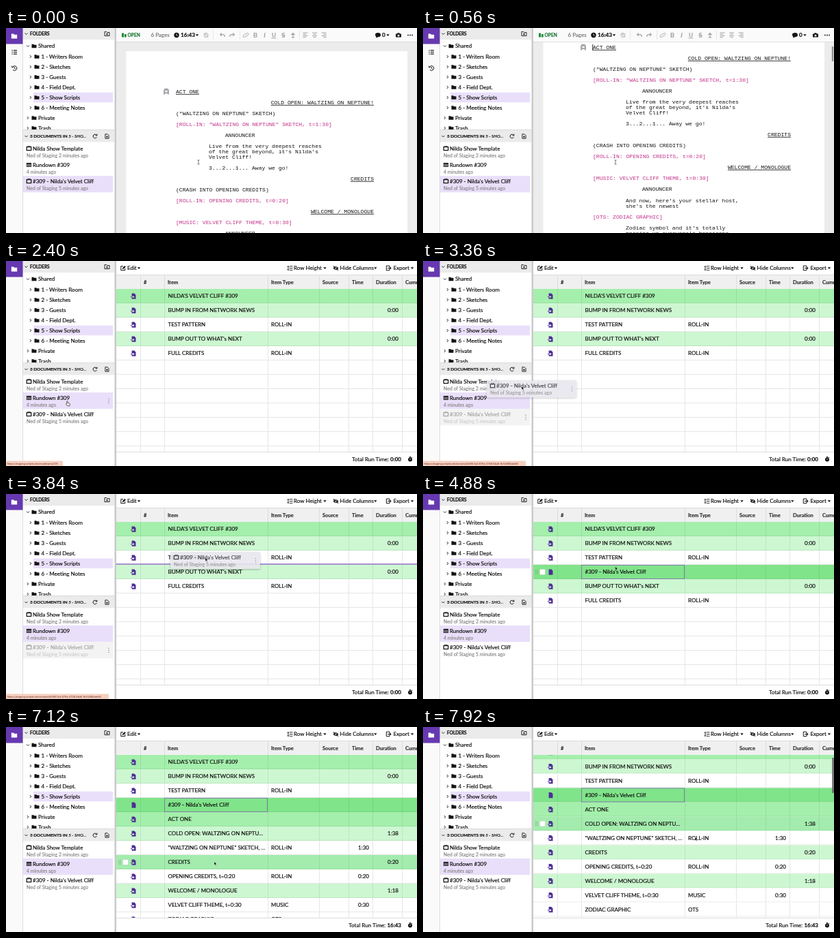
An HTML page that plays this animation: 600 px wide and 301 px high, repeating every 8000 ms.

```html
<!DOCTYPE html>
<html lang="en">
<head>
<meta charset="utf-8">
<title>Rundown import</title>
<style>
  html, body { margin: 0; width: 100%; height: 100%; overflow: hidden; background: #fff; }
  svg { display: block; width: 600px; height: 301px; font-family: Lato, "Open Sans", sans-serif; }
  text { white-space: pre; stroke-width: .2px; }
  .mono { font-family: "Liberation Mono", "Courier New", monospace; stroke: none; }
  .keys { font-family: Lato, "DejaVu Sans", sans-serif; stroke: none; }
  .url { font-family: "DejaVu Sans", sans-serif; stroke: none; }
</style>
</head>
<body>
<svg id="stage" viewBox="0 0 600 301" xmlns="http://www.w3.org/2000/svg"></svg>
<script>
const LOOP = 8000, STEP = 80;
const INK = '#141414', GREY = '#8a8a8a', PURPLE = '#4f2d96', LILAC = '#e9dffa', PINK = '#c2318a';
const ROW = 21, TOP = 41;
const DROP = 4400, MENU = 5360, IMPORT = 6560, LOADED = 1840;

// y is the vertical middle of the capitals
const text = (x, y, s, size = 8, fill = INK, attrs = '') =>
  `<text x="${x}" y="${y + size * 0.36}" font-size="${size}" fill="${fill}" stroke="${fill}" ${attrs}>${s}</text>`;
const box = (x, y, w, h, fill, attrs = '') =>
  `<rect x="${x}" y="${y}" width="${w}" height="${h}" fill="${fill}" ${attrs}/>`;
const shape = (x, y, d, fill = INK) => `<path transform="translate(${x} ${y})" d="${d}" fill="${fill}" fill-rule="evenodd"/>`;
const line = (x, y, d, color = INK, w = 1) =>
  `<path transform="translate(${x} ${y})" d="${d}" fill="none" stroke="${color}" stroke-width="${w}"/>`;
const group = (id, body, attrs = '') => `<g id="${id}" ${attrs}>${body}</g>`;
const BOLD = 'font-weight="700"', END = 'text-anchor="end"';

const FOLDER = 'M-3.5-2.8h2.7l1 1h3.3v4.6h-7z';
const FILE = 'M-2.9-4.1h3.7l2.2 2.2v6h-5.9z';
const IMPORT_FILE = FILE + 'M-4.4.4h1.5v1.2h-1.5zM-2.9.4h1.9v-1.3l2.1 1.9-2.1 1.9v-1.3h-1.9z';
const SCRIPT = 'M-3.2-2.3h6.4v5h-6.4zM-1.8-3.7l1.8 1.4 1.8-1.4';
const down = (x, y, c = INK) => shape(x, y, 'M-2.2-1.2h4.4l-2.2 2.6z', c);
const chevron = (x, y) => line(x, y, 'M-2-1l2 2 2-2', INK, .9);
const folder = (x, y) => shape(x, y, FOLDER);
const dots = (x, y) => [-3, 0, 3].map(d => `<circle cx="${x}" cy="${y + d}" r=".7" fill="#8a7d9a"/>`).join('');
const grid = (x, y) => shape(x, y, 'M-3.6-3h7.2v6h-7.2zM-2.8-1.2v.9h1.5v-.9zM-.7-1.2v.9h1.4v-.9zM1.3-1.2v.9h1.5v-.9zM-2.8.8v1.2h1.5v-1.2zM-.7.8v1.2h1.4v-1.2zM1.3.8v1.2h1.5v-1.2z');
const fileAdd = (x, y) => line(x, y, 'M-2.6-3.2h3.2l2 2v4.4h-5.2zM-1.4.8h2.8M0-.6v2.8', INK, 0.9);
const watch = (x, y) => `<circle cx="${x}" cy="${y + .5}" r="3" fill="${INK}"/>` +
  line(x, y, 'M-1.2-3.4h2.4M0-3v1M2-2l1-1', INK, 1) + line(x, y, 'M0-.9v1.8', '#fff', .8);

function sidebar() {
  const kids = ['1 - Writers Room', '2 - Sketches', '3 - Guests', '4 - Field Dept.', '5 - Show Scripts', '6 - Meeting Notes'];
  const right = (x, y) => line(x, y, 'M-1.2-2l2 2-2 2', INK, .9);
  let s = box(0, 0, 161, 301, '#fff') + box(0, 0, 24.5, 301, '#fafafa') + box(24, 0, 1, 301, '#dcdcdc') +
    box(0, 0, 24.5, 23.5, '#6639b0') + shape(12, 12, 'M-4.2-3.4h3.2l1.2 1.2h4v5.6h-8.4z', '#fff');
  s += group('rail',
    line(12.5, 35.5, 'M-1.5-2.7h5M-1.5 0h5M-1.5 2.7h5M-4-2.7h1.4M-4 0h1.4M-4 2.7h1.4', INK, 1.2) +
    line(12.5, 59, 'M-2.6-2.2A3.4 3.4 0 1 1-2.5 2.4M-3.8-3.4v2.2h2.3M0-1.8v2l1.4.8', INK, 1));
  s += box(25, 0, 133.5, 17, '#ebebeb') + chevron(29.5, 8.5) + text(35, 8.5, 'FOLDERS', 6.5, INK, BOLD) +
    line(147.5, 8.5, 'M-3.5-3h2.6l1 1h3.4v5h-7zM-1.5.6h3M0-.9v3', INK, .9);
  s += chevron(32, 26.5) + folder(41, 26.5) + text(47, 26.5, 'Shared') +
    box(40, 94.7, 116, 14.5, LILAC);
  kids.forEach((k, i) => {
    const y = 42 + i * 15;
    s += right(36, y) + folder(45, y) + text(51.5, y, k);
  });
  s += right(32, 132) + folder(41, 132) + text(47, 132, 'Private') +
    right(32, 147) + folder(41, 147) + text(47, 147, 'Trash');
  s += box(25, 149, 133.5, 18.5, '#ebebeb') + box(25, 149, 133.5, .7, '#d5d5d5') + chevron(29.5, 159) +
    text(35, 159, '3 DOCUMENTS IN <tspan font-style="italic" font-weight="400">5 - SHO…</tspan>', 6.4, INK, BOLD) +
    line(130, 159, 'M2.4 1.3A2.8 2.8 0 1 1 2.2-1.7M2.9-3.4v2.3h-2.3', INK, 1) + fileAdd(147.5, 159);
  const docs = [
    ['Nilda Show Template', 'Ned of Staging 2 minutes ago'],
    ['Rundown #309', '4 minutes ago'],
    ["#309 - Nilda's Velvet Cliff", 'Ned of Staging 5 minutes ago']
  ];
  docs.forEach((d, i) => {
    s += box(25, 168.8 + i * 24.2, 131, 24.2, LILAC, `id="bg${i}"`) + group('doc' + i, docLabel(d, i));
    s += group('dots' + i, dots(150, 181.5 + i * 24));
  });
  s += box(158.5, 0, 2.5, 301, '#c9c9cb');
  s += group('status', box(0, 293.5, 83, 8, '#f6cfc0', 'id="statusBg" rx="1"') +
    text(1.5, 297.3, '', 3.6, '#5f2a1c', 'id="url" class="url"'));
  return s;
}
function docLabel([title, sub], i) {
  const y = 177 + i * 24;
  const icon = i === 1 ? grid(33.5, y) : line(33.5, y, SCRIPT, INK, 1.3);
  return icon + text(39, y, title) + text(30, y + 10.2, sub, 7, GREY);
}

function script() {
  const lines = [
    [93, 248, 'ACT ONE', 'u'], [109, 537, 'COLD OPEN: WALTZING ON NEPTUNE!', 'r'],
    [125, 248, '("WALTZING ON NEPTUNE" SKETCH)'], [141, 248, '[ROLL-IN: "WALTZING ON NEPTUNE" SKETCH, t=1:30]', 'p'],
    [157, 320, 'ANNOUNCER'], [173, 296, 'Live from the very deepest reaches'],
    [181, 296, "of the great beyond, it's Nilda's"], [189, 296, 'Velvet Cliff!'],
    [205, 296, '3...2...1... Away we go!'], [221, 537, 'CREDITS', 'r'],
    [237, 248, '(CRASH INTO OPENING CREDITS)'], [253, 248, '[ROLL-IN: OPENING CREDITS, t=0:20]', 'p'],
    [269, 537, 'WELCOME / MONOLOGUE', 'r'], [285.5, 248, '[MUSIC: VELVET CLIFF THEME, t=0:30]', 'p'],
    [301.5, 320, 'ANNOUNCER'], [318, 296, "And now, here's your stellar host,"],
    [326, 296, "she's the newest"], [342, 248, '[OTS: ZODIAC GRAPHIC]', 'p'],
    [358, 296, "Zodiac symbol and it's totally"], [366, 296, "messing up everyone's horoscope"]
  ];
  let page = box(175.5, 34, 410.5, 500, '#fff') +
    shape(234, 93.5, 'M-4 4v-5a4 4 0 0 1 8 0v5h-2l-.7-1.6h-2.6l-.7 1.6zM-1.6-1.6v2.2h3.2v-2.2z', '#a9a9ae');
  for (const [y, x, s, kind = ''] of lines) {
    const under = kind === 'u' || kind === 'r' ? 'text-decoration="underline"' : '';
    page += text(x, y, s, 8.08, kind === 'p' ? PINK : INK, `class="mono" ${under} ${kind === 'r' ? END : ''}`);
  }
  page += box(247.3, 89, .9, 9, INK, 'id="caret"');
  const soft = '#a3a3a3', rule = x => box(x, 3, .7, 14, '#dedede');
  let bar = box(161, 0, 439, 20, '#fafafa') + box(161, 20, 439, .8, '#d9d9d9') +
    shape(172.5, 10.5, 'M-3.5 3v-6h3v6zM.4 3v-4.6h2.8v4.6z', '#1e8a3b') + text(177.5, 10.5, 'OPEN', 6.6, '#187a33', BOLD) +
    text(211.5, 10.5, '6 Pages', 8, '#777') +
    `<circle cx="249" cy="10.5" r="3.7" fill="${INK}"/>` + line(249, 10.5, 'M0-2.2v2.4l1.5 1', '#fff', .8) +
    text(255, 10.5, '16:43', 8.2, INK, BOLD) + down(279, 10.5) +
    line(292, 10.5, 'M-3 0a3 3 0 1 0 6 0a3 3 0 1 0-6 0M-3-3l6 6M0-1.8v1.8', soft, .9) + rule(302) +
    line(316, 10.5, 'M-1.2-3l-2.2 2.2 2.2 2.2M-3-.8h3.6q2.8 0 2.8 3.4', soft, 1.2) +
    line(330, 10.5, 'M1.2-3l2.2 2.2-2.2 2.2M3-.8h-3.6q-2.8 0-2.8 3.4', soft, 1.2) + rule(341) +
    line(350, 10.5, 'M-.3 1.6l-1.2 1.2a1.5 1.5 0 0 1-2.1-2.1l1.9-1.9a1.5 1.5 0 0 1 2.1 0M.3-1.6l1.2-1.2a1.5 1.5 0 0 1 2.1 2.1l-1.9 1.9a1.5 1.5 0 0 1-2.1 0', soft, 1) +
    text(364, 10.5, 'B', 9, soft, BOLD + ' text-anchor="middle"') +
    text(377.5, 10.5, 'I', 9, soft, 'font-style="italic" font-weight="700" text-anchor="middle"') +
    text(391, 10.2, 'U', 8.4, soft, 'font-weight="700" text-decoration="underline" text-anchor="middle"') +
    text(405, 10.5, 'S', 9, soft, 'font-weight="700" text-decoration="line-through" text-anchor="middle"') +
    line(419, 10.5, 'M0 3.5v-6M-2.6-.2l2.6-2.8 2.6 2.8M-2 3.4h4', soft, 1.2) + rule(428);
  ['M-3.5-3h7M-3.5-.8h4.5M-3.5 1.4h7M-3.5 3.6h4.5', 'M-3.5-3h7M-2.2-.8h4.4M-3.5 1.4h7M-2.2 3.6h4.4', 'M-3.5-3h7M-1-.8h4.5M-3.5 1.4h7M-1 3.6h4.5']
    .forEach((d, i) => bar += line(437 + i * 13.6, 10, d, soft, 1));
  bar += shape(543, 10.5, 'M-4-.4a4 3.2 0 1 1 4 3.2q-1.4 1-3.3 1 1-.9.7-1.7q-1.4-1-1.4-2.5z') +
    text(549, 10.5, '0', 8.2, INK, BOLD) + down(557.5, 10.5) +
    shape(573, 10.5, 'M-4-2h2l.8-1.3h2.4l.8 1.3h2v5h-8zM-1.5.4a1.5 1.5 0 1 0 3 0a1.5 1.5 0 1 0-3 0z') +
    [587, 590, 593].map(x => `<circle cx="${x}" cy="10.5" r=".9" fill="${INK}"/>`).join('');
  return box(161, 20, 439, 281, '#ececec') +
    `<g clip-path="url(#docClip)">${group('page', page)}${group('blank', box(161, 20, 439, 281, '#fff'))}</g>` +
    box(596.8, 27, 2.4, 22, '#8f8f8f', 'id="docThumb" rx="1.2"') + bar;
}

const COLS = [196, 231, 382, 457, 500, 535, 578];
const FILL = { a: '#a4efab', b: '#cdf7d1', s: '#80e48a', w: '#fff' };
const HOVER = { a: '#8fe798', b: '#a3ecad', s: '#80e48a', w: '#f5f5f5' };
const BASE = [
  ['a', "NILDA'S VELVET CLIFF #309"], ['b', 'BUMP IN FROM NETWORK NEWS', '', '', '0:00'],
  ['w', 'TEST PATTERN', 'ROLL-IN'], ['b', "BUMP OUT TO WHAT's NEXT", '', '', '0:00'], ['w', 'FULL CREDITS', 'ROLL-IN']
];
const ADDED = [
  ['a', 'ACT ONE'], ['b', 'COLD OPEN: WALTZING ON NEPTU…', '', '', '1:38'],
  ['w', '"WALTZING ON NEPTUNE" SKETCH, …', 'ROLL-IN', '1:30'], ['b', 'CREDITS', '', '', '0:20'],
  ['w', 'OPENING CREDITS, t=0:20', 'ROLL-IN', '0:20'], ['b', 'WELCOME / MONOLOGUE', '', '', '1:18'],
  ['w', 'VELVET CLIFF THEME, t=0:30', 'MUSIC', '0:30'], ['w', 'ZODIAC GRAPHIC', 'OTS'], ['w', '']
];
const LINK = ['s', "#309 - Nilda's Velvet Cliff"];
const split = extra => [...BASE.slice(0, 3), ...extra, ...BASE.slice(3)];

function rows(list) {
  let s = '', selected = '';
  for (let i = 0; i < 15; i++) {
    const y = TOP + i * ROW, mid = y + 10.3, [kind, item, type = '', time = '', dur = ''] = list[i] || ['w', ''];
    const edge = kind === 'w' ? '#e6e6e6' : 'rgba(60,110,70,.13)';
    s += box(161, y, 439, ROW, FILL[kind], `class="fill" data-kind="${kind}"`) + box(161, y + ROW - 1, 439, 1, edge);
    COLS.forEach(x => s += box(x, y, 1, ROW - 1, edge));
    if (!item) continue;
    s += shape(186.5, mid + .3, kind === 's' ? FILE : IMPORT_FILE, PURPLE);
    s += text(236.5, mid, item) + text(387, mid, type) + text(530, mid, time, 8, INK, END) + text(573, mid, dur, 8, INK, END);
    if (kind === 's') selected = box(231.5, y + .5, 150, ROW - 1, 'none', 'stroke="#7f75a8" stroke-width=".9"');
  }
  return s + selected;
}

function rundown() {
  const heads = ['#', 'Item', 'Item Type', 'Source', 'Time', 'Duration', 'Cumulative'];
  let s = box(161, 0, 439, 301, '#fff') + `<g clip-path="url(#tableClip)">` + group('body',
    group('rows0', rows(BASE)) + group('rows1', rows(split([LINK]))) + group('rows2', rows(split([LINK, ...ADDED]))) +
    group('hover', line(166, 0, 'M-1.2-3v1M-1.2-.5v1M-1.2 2v1M1.2-3v1M1.2-.5v1M1.2 2v1', '#6f8a74', 1.1) +
      box(170.5, -4, 8, 8, '#fff', 'rx="1.2" stroke="#c3d3c5" stroke-width=".7"'))) +
    box(161, 0, 439, 1.1, '#6a48b5', 'id="dropLine"') + '</g>';
  s += box(161, 20, 439, 21, '#f0f0f0') + box(161, 20, 439, 1, '#dcdcdc');
  heads.forEach((h, i) => s += box(COLS[i], 21, 1, 20, '#dcdcdc') + text(COLS[i] + 5, 31, h, 7.5, '#333', BOLD));
  s += line(171, 10.5, 'M0-2.8h-3.2v6h6v-3', INK, 1) + shape(171, 10.5, 'M-1.2 1.4l.4-1.8 3.2-3.2 1.5 1.5-3.2 3.2z') +
    text(177, 10.5, 'Edit') + down(194, 10.5) +
    line(415, 10.5, 'M-1-2.8h4.5M-1 0h4.5M-1 2.8h4.5M-3-3v6M-4.2-1.8l1.2-1.4 1.2 1.4M-4.2 1.8l1.2 1.4 1.2-1.4', INK, .9) +
    text(420, 10.5, 'Row Height') + down(465.5, 10.5) +
    shape(481.5, 10.5, 'M-4 0q4-5.2 8 0q-4 5.2-8 0zM-1.5 0a1.5 1.5 0 1 0 3 0a1.5 1.5 0 1 0-3 0z') +
    line(481.5, 10.5, 'M-3.6-3.2l7.2 6.4', INK, 1.1) + text(487.5, 10.5, 'Hide Columns') + down(539.3, 10.5) +
    line(558.5, 10.5, 'M1.4-1.4v-2h-4.6v6.6h4.6v-1.8', INK, 1) + shape(558.5, 10.5, 'M-1.4-.6h3v-1.6l2.6 2.2-2.6 2.2v-1.6h-3z') +
    text(565.5, 10.5, 'Export') + down(593, 10.5);
  s += box(161, 280, 439, 21, '#fff') + box(161, 280, 439, 1, '#dcdcdc') +
    text(577, 291, 'Total Run Time: <tspan id="total" font-weight="700">0:00</tspan>', 8, INK, END) + watch(590, 291);
  return s + box(597.3, 45, 2.5, 52, '#666', 'id="rowThumb" rx="1.1"');
}

function menu() {
  const up = 'M0 3.2v-5.4M-2.4-.2l2.4-2.4 2.4 2.4', bar = up + 'M-2.8-3.4h5.6';
  const items = [
    [148.3, 'Insert row above', up, '⌥⌘I'], [163.6, 'Insert Slug row above', bar, ''], [179, 'Insert Act row above', bar, '']
  ];
  const key = (y, s) => text(412, y, s, 6, '#999', END + ' class="keys"');
  let s = box(275, 118, 143, 113, '#fff', 'rx="2.5" filter="url(#shadow)"') + box(275, 0, 143, 15, '#f2f2f2', 'id="menuHover"') +
    shape(284.5, 128, 'M-3.3-3.3h6.6v6.6h-6.6z') + line(284.5, 128, 'M-1.8 0l1.4 1.4 2.4-2.7', '#fff', 1) +
    text(294, 128, 'Select all rows in this Script') + key(128, '⌥Click');
  for (const [y, label, d, k] of items) s += line(284.5, y, d, INK, 1.1) + text(294, y, label) + key(y, k);
  s += shape(284.5, 200, IMPORT_FILE) + text(294, 200, 'Import rows from script') +
    shape(284.5, 220.5, 'M-3-3.4h1.8l.4-.6h1.6l.4.6h1.8v1h-6zM-2.5-1.8h5l-.4 5.4h-4.2z', '#d3222a') +
    text(294, 220.5, 'Delete row', 8, '#d3222a') + key(220.5, '⌘Delete');
  [138, 189.7, 210.3].forEach(y => s += box(275, y, 143, .7, '#e4e4e4'));
  return s;
}

const ghost = box(25, 217, 131, 25, '#e9e6ee', 'opacity=".88" rx="2" filter="url(#shadow)"') +
  `<g opacity=".75">${docLabel(["#309 - Nilda's Velvet Cliff", 'Ned of Staging 5 minutes ago'], 2)}${dots(149.5, 229.5)}</g>`;
const pointers =
  group('beam', line(0, 0, 'M-1.6-3.2q1.6 0 1.6 1v4.4q0 1-1.6 1M1.6-3.2q-1.6 0-1.6 1M0 2.2q0 1 1.6 1', '#555', .8)) +
  group('arrow', '<path d="M0-2.3v5l1.2-1 .9 1.9.9-.4-.9-1.9h1.5z" fill="#000" stroke="#fff" stroke-width=".4"/>') +
  group('hand', '<path d="M-1.2-3q.7-.8 1.3 0v2.5l2.6.6q.9.3.7 1.3l-.5 2.3h-3.4l-2-2.6q0-.9 1.3-.3z" fill="#fff" stroke="#222" stroke-width=".7"/>');

const stage = document.getElementById('stage');
stage.innerHTML = `<defs>
  <clipPath id="docClip"><rect x="161" y="20" width="439" height="281"/></clipPath>
  <clipPath id="tableClip"><rect x="161" y="41" width="439" height="239"/></clipPath>
  <filter id="shadow" x="-10%" y="-20%" width="120%" height="150%"><feDropShadow dx="0" dy="1" stdDeviation="1.8" flood-opacity=".3"/></filter>
  </defs>` + group('script', script()) + group('rundown', rundown()) + sidebar() +
  group('menu', menu()) + group('ghost', ghost) + group('pointer', pointers);

const $ = Object.fromEntries([...stage.querySelectorAll('[id]')].map(n => [n.id, n]));
const fills = [0, 1, 2].map(i => [...$['rows' + i].querySelectorAll('.fill')]);
const show = (id, on) => $[id].setAttribute('display', on ? 'inline' : 'none');
const move = (id, x, y) => $[id].setAttribute('transform', `translate(${x} ${y})`);
const ease = k => k * k * (3 - 2 * k);
const ramp = (t, a, b) => ease(Math.min(1, Math.max(0, (t - a) / (b - a))));

const PATH = [
  [0, 281, 197], [640, 281, 197], [1040, 90, 209], [2480, 90, 209], [2880, 76, 228], [3120, 76, 228],
  [3760, 291, 96], [4560, 291, 96], [5120, 274, 117], [5440, 274, 117], [6000, 304, 186],
  [6160, 304, 186], [6400, 304, 200], [7200, 304, 200], [7600, 397, 164], [8000, 397, 164]
];
function pointerAt(t) {
  const i = PATH.findIndex((p, n) => n && t <= p[0]);
  const [t0, x0, y0] = PATH[i - 1], [t1, x1, y1] = PATH[i], k = ramp(t, t0, t1);
  return [x0 + (x1 - x0) * k, y0 + (y1 - y0) * k];
}

function draw(t) {
  const [x, y] = pointerAt(t);
  const loaded = t >= LOADED, drag = t > 3120 && t < DROP, open = t >= MENU && t < IMPORT;
  const side = x < 158, over = side && !drag ? Math.floor((y - 168.8) / 24.2) : -1;

  show('script', !loaded);
  show('rundown', loaded);
  show('rail', !loaded);
  show('blank', t >= 1520);
  const scroll = 65 * ramp(t, 40, 520);
  move('page', 0, -scroll);
  show('caret', t >= 400 && t < 960);
  show('docThumb', t > 0 && t < 1280);
  move('docThumb', 0, (scroll - 65) / 13);

  const chosen = t >= 1360 ? 1 : 2;
  for (let i = 0; i < 3; i++) {
    const held = drag && i === 2;
    show('bg' + i, i === chosen || i === over || held);
    $['bg' + i].setAttribute('fill', i === chosen ? LILAC : held ? '#f3f3f3' : '#f3edfc');
    show('dots' + i, i === over || held);
    $['doc' + i].setAttribute('opacity', held ? .35 : 1);
  }
  const onScript = over === 2 || t > 2880;
  show('status', over === 1 || over === 2 || t > 2880 && t < 4480);
  $.statusBg.setAttribute('width', onScript ? 150 : 83);
  $.url.textContent = 'https://staging.scripto.dev/' +
    (onScript ? 'scripts/d38f47a4-879e-4708-8ba0-9cf1686bda90' : 'rundowns/239');

  const phase = t >= IMPORT ? 2 : t >= DROP ? 1 : 0;
  for (let i = 0; i < 3; i++) show('rows' + i, i === phase);
  $.total.textContent = phase === 2 ? '16:43' : '0:00';
  move('body', 0, -14.5 * ramp(t, 7600, 7920));
  show('rowThumb', t > 7600);

  // the hovered row is the one under the pointer before the table scrolls
  const hovering = loaded && !side && !drag && !open, row = Math.floor((y - TOP) / ROW);
  fills[phase].forEach((f, i) => f.setAttribute('fill', (hovering && i === row ? HOVER : FILL)[f.dataset.kind]));
  show('hover', hovering);
  move('hover', 0, TOP + row * ROW + 10.5);
  show('dropLine', drag && x > 161);
  move('dropLine', 0, TOP - 1.6 + Math.round((y - TOP) / ROW) * ROW);

  show('menu', open);
  const slot = [[120.5, 136], [140.5, 156], [156, 171.3], [171.3, 187], [192, 208]].find(([a, b]) => y >= a && y < b);
  show('menuHover', open && !!slot);
  if (slot) $.menuHover.setAttribute('y', (slot[0] + slot[1]) / 2 - 7.4);

  show('ghost', drag);
  move('ghost', x - 76, y - 228);
  const kind = !loaded && !side ? 'beam' : !drag && (side || open && t > 5440) ? 'hand' : 'arrow';
  for (const k of ['beam', 'arrow', 'hand']) show(k, k === kind);
  move('pointer', x, y);
}

let start;
function tick(now) {
  start ??= now;
  draw(Math.floor((now - start) % LOOP / STEP) * STEP);
  requestAnimationFrame(tick);
}
draw(0);
requestAnimationFrame(tick);
</script>
</body>
</html>
```
